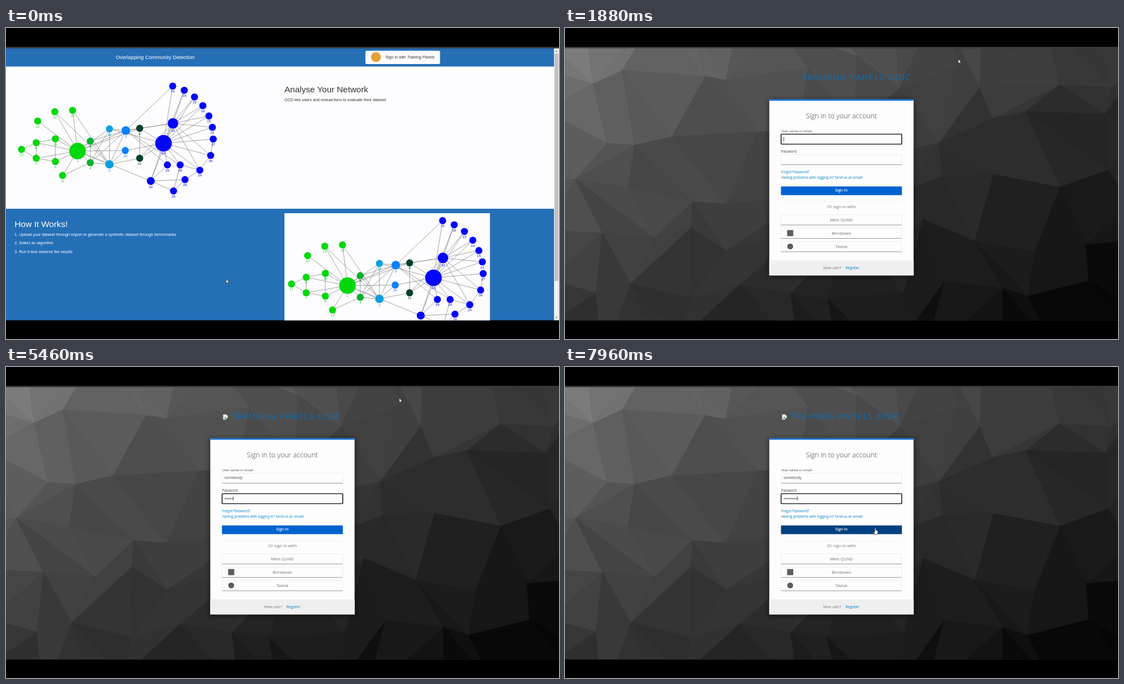
An HTML page that plays this animation: 997 px wide and 561 px high, repeating every 8 s.

```html
<!DOCTYPE html>
<html lang="en">
<head>
<meta charset="utf-8">
<title>Sign-in walkthrough</title>
<style>
  html, body { margin: 0; width: 100%; height: 100%; overflow: hidden; background: #000; }
  svg { display: block; width: 100%; height: 100%; }
  #home { font-family: "Liberation Sans", Arial, sans-serif; font-size: 7.25px; }
  #login { font-family: "Open Sans", sans-serif; font-size: 6.2px; fill: #444; }
  .mid { text-anchor: middle; }
  .heading { font-size: 15.45px; }
  .node-label { font-size: 6.2px; text-anchor: middle; }
  .title { font-size: 15px; letter-spacing: 1.56px; fill: #0b70ba; }
  .link { fill: #0080c0; }
  .typed { font-size: 6.6px; }
  .provider { font-size: 7.4px; fill: #6a6e73; }
  .field { fill: #fdfdfe; stroke: #e9e9eb; stroke-width: .8; }
  .underline { stroke: #8d8f92; stroke-width: .9; }
  .focus { fill: #fdfdfe; stroke: #222429; stroke-width: 1.7; }
</style>
</head>
<body>
<svg viewBox="0 0 997 561" preserveAspectRatio="none">
  <defs>
    <clipPath id="page"><rect y="36.5" width="997" height="491"/></clipPath>
    <filter id="shadow" x="-10%" y="-10%" width="120%" height="120%"><feGaussianBlur stdDeviation="4"/></filter>
  </defs>
  <rect width="997" height="561"/>
  <rect y="34" width="997" height="3" fill="#3a3a3b"/>

  <g clip-path="url(#page)">
    <g id="home">
      <rect y="36.5" width="988" height="491" fill="#256fb7"/>
      <rect y="69.5" width="988" height="256.5" fill="#fdfcfe"/>
      <rect x="502" y="334" width="370.5" height="200" fill="#fdfcfe"/>
      <rect x="648" y="41" width="134.5" height="24" rx="2" fill="#fdfcfe"/>
      <circle cx="667" cy="52.5" r="9" fill="#e5a23a"/>
      <g fill="#fff">
        <text x="198" y="55.6" font-size="9.33">Overlapping Community Detection</text>
        <text x="15.5" y="358.5" class="heading">How It Works!</text>
        <text x="15.5" y="374.5">1. Upload your dataset through import or generate a synthetic dataset through benchmarks</text>
        <text x="15.5" y="390.2">2. Select an algorithm</text>
        <text x="15.5" y="405.8">3. Run it and observe the results</text>
      </g>
      <g fill="#333">
        <text x="684" y="55.2">Sign in with <tspan font-style="italic">Training Panels</tspan></text>
        <text x="502" y="116" class="heading">Analyse Your Network</text>
        <text x="502" y="131.8">OCD lets users and researchers to evaluate their dataset</text>
      </g>
      <g id="graph"></g>
      <use href="#graph" x="486.7" y="242.7"/>
      <rect x="988" y="36.5" width="9" height="491" fill="#f1f1f2"/>
      <rect x="989" y="46" width="7" height="410" fill="#c1c1c3"/>
      <path d="M990.5 43l2-2.4 2 2.4zM990.5 521l2 2.4 2-2.4z" fill="#777"/>
    </g>

    <g id="login">
      <g id="mesh"></g>
      <g id="broken">
        <path d="M391.5 85.5h5.5l3 3v6.5h-8.5z" fill="#e8e9ec"/>
        <path d="M392.5 93.5l3-3.5 2 1.5-2 2z" fill="#58a55c"/>
        <path d="M396 95l4-4v4z" fill="#444"/>
      </g>
      <text id="heading" y="94.3" class="title mid">TRAINING PANELS OIDC</text>
      <rect x="367" y="129" width="263" height="320" opacity=".5" fill="#000" filter="url(#shadow)"/>
      <rect x="368.3" y="128.5" width="260.2" height="317.8" fill="#fdfdfe"/>
      <rect x="368.3" y="128.5" width="260.2" height="2.5" fill="#0062cc"/>
      <rect x="368.3" y="419" width="260.2" height="27.3" fill="#f0eff0"/>
      <text x="498.3" y="163.3" class="mid" font-size="12.5" font-weight="300">Sign in to your account</text>
      <text x="389.7" y="187.7" font-size="6.05">User name or email</text>
      <text x="389.7" y="225">Password</text>
      <g id="fields"></g>
      <text id="account" x="394" y="202.3" class="typed"></text>
      <g id="dots"></g>
      <rect id="caret" width=".8" height="7.5" fill="#222"/>
      <text x="389.7" y="261.8" class="link">Forgot Password?</text>
      <text x="389.7" y="272" class="link">Having problems with logging in? Send us an email!</text>
      <rect id="submit" x="389.4" y="285.8" width="218" height="15.7"/>
      <text x="498.3" y="295.3" class="mid" font-size="6.8" font-weight="600" fill="#fff">Sign In</text>
      <path d="M389.5 313H607" stroke="#f1f1f2"/>
      <text x="498.3" y="325.4" class="mid" font-size="7.7" fill="#777">Or sign in with</text>
      <g id="providers"></g>
      <rect x="400.5" y="364.5" width="11" height="11" fill="#5a5c60"/>
      <circle cx="406" cy="394" r="5.3" fill="#5a5c60"/>
      <text x="465.5" y="434.9" font-size="6.7" fill="#777">New user?</text>
      <text x="505.7" y="434.9" font-size="6.7" class="link">Register</text>
    </g>
  </g>

  <g id="cursor" stroke="#222" stroke-width=".7" stroke-linejoin="round" fill="#fff">
    <path id="arrow" d="M0 0V7.8L1.8 6.2 3 9 4.2 8.5 3 5.8H5.4Z"/>
    <path id="hand" d="M-.9 .8Q0-.7 .9 .8V4L4.6 5V8.5L3.7 11.5H-.8L-3 7.2-2.4 6.2-.9 7.2Z"/>
  </g>
</svg>
<script>
const $ = id => document.getElementById(id);
const show = (id, on) => $(id).style.display = on ? '' : 'none';
const range = (from, to) => Array.from({ length: to - from + 1 }, (_, i) => from + i);

function drawGraph() {
  // Hubs and a few anchors; the rest sit on arcs and in mirrored pairs
  const at = { 1: [129, 222], 3: [216, 185], 13: [102, 266], 17: [28, 219], 20: [215, 221],
    25: [302, 294], 28: [314, 247], 29: [291, 247], 32: [261, 276], 33: [301, 172], 34: [284, 208] };
  const arc = (ids, [cx, cy], r, growth, start, step) => ids.forEach((id, i) => {
    const a = (start + step * i) * Math.PI / 180, d = r + growth * i;
    at[id] = [cx + d * Math.cos(a), cy + d * Math.sin(a)];
  });
  const pair = (top, bottom, x, y, half) => {
    at[top] = [x, y - half];
    at[bottom] = [x, y + half];
  };
  arc([10, 16, 23, 19, 15, 21, 27], [282, 200], 97, -.9, -79, 13.2);
  arc([30, 24, 26], [282, 200], 92, -4, 19, 21);
  arc([12, 22, 18], at[1], 90, -8, 217, 23);
  pair(6, 7, 54.5, 221, 14);
  pair(11, 5, 89, 220.5, 20.5);
  pair(8, 4, 152, 223.5, 19.5);
  pair(14, 2, 186.5, 214, 32);
  pair(9, 31, 241, 208, 27);

  let lines = '';
  const chain = (...ids) => lines += 'M' + ids.map(id => at[id]).join('L');
  const connect = (hubs, ends) => hubs.forEach(hub => ends.forEach(end => chain(hub, end)));
  connect([1], [...range(2, 9), ...range(11, 14), 18, 20, 22, 32]);
  connect([2, 3, 4], [8, 14]);
  connect([2], [3, 18, 20, 22, 31]);
  connect([3], [9, 10, 28, 29, 33]);
  connect([4], [2, 3, 13]);
  connect([33, 34], [9, 15, 16, 19, 21, 23, 24, 30, 31, 32]);
  connect([34], [10, 14, 20, 27, 28, 29, 33]);
  connect([24, 25], [26, 28]);
  chain(7, 6, 11, 5, 7, 17, 6);
  chain(24, 30, 27);
  chain(25, 32, 26);
  chain(29, 32);
  chain(9, 31);

  // Community colour shifts from left to right
  const tint = x => x < 135 ? '#00d80a' : x < 165 ? '#06b02f' : x < 200 ? '#0b9fe0'
    : x < 225 ? '#0a80fa' : x < 250 ? '#04402a' : '#0505fa';
  const radius = id => ({ 1: 15, 34: 15, 33: 9.6, 2: 7.6, 3: 7.8, 32: 7.2 })[id] || 6.4;
  const nodes = Object.entries(at).map(([id, [x, y]]) => `<g fill="${tint(x)}">
    <circle cx="${x}" cy="${y}" r="${radius(id)}"/>
    <text class="node-label" x="${x}" y="${y + radius(id) + 5.3}">${id}</text></g>`);
  $('graph').innerHTML = `<path d="${lines}" fill="none" stroke="#858585" stroke-width=".75"/>` + nodes.join('');
}

// Low-poly backdrop: a jittered grid split into triangles, darker to the lower right
function drawMesh() {
  const cols = 12, rows = 6, w = 997 / (cols - 1), h = 491 / (rows - 1);
  let seed = 11, out = '';
  const random = () => (seed = seed * 16807 % 2147483647) / 2147483647;
  const jitter = () => (random() - .5) * .75;
  const grid = range(0, rows).map(r => range(0, cols).map(c =>
    [(c - .5 + jitter()) * w, 36.5 + (r - .5 + jitter()) * h]));
  const facet = (...points) => {
    const [x, y] = [0, 1].map(k => points.reduce((sum, p) => sum + p[k], 0) / 3);
    const glow = 22 * Math.exp(-Math.hypot(x, y - 37) / 150);
    const v = Math.max(2, Math.round(104 - 50 * x / 997 - 50 * (y - 37) / 491 + glow + jitter() * 13));
    const tone = `rgb(${v},${v},${v + 1})`;
    out += `<path d="M${points.join('L')}Z" fill="${tone}" stroke="${tone}" stroke-width=".6"/>`;
  };
  for (let r = 0; r < rows; r++) for (let c = 0; c < cols; c++) {
    const a = grid[r][c], b = grid[r][c + 1], d = grid[r + 1][c], e = grid[r + 1][c + 1];
    if (random() < .5) { facet(a, b, d); facet(b, d, e); }
    else { facet(a, b, e); facet(a, d, e); }
  }
  $('mesh').innerHTML = `<rect y="36" width="997" height="492" fill="#333"/>` + out;
}

const box = (y, h, focused) => `<rect x="389.6" y="${y}" width="217.6" height="${h}" rx="1"
  class="${focused ? 'focus' : 'field'}"/>` +
  (focused ? '' : `<path class="underline" d="M389.5 ${y + h}H607"/>`);

function drawProviders() {
  const names = ['Mein QUND', 'Brindovex', 'Tavlok'];
  $('providers').innerHTML = names.map((name, i) => box(337 + i * 24.2, 18.3) +
    `<text class="provider mid" x="498.3" y="${348.8 + i * 23.9}">${name}</text>`).join('');
}

// Timeline in ms
const LOOP = 8000, OPEN_LOGIN = 1700, IMAGE_FAILS = 2200, TAB = 4730;
const ACCOUNT = 'somebody';
const nameKeys = { start: 3070, step: 210 }, passKeys = { start: 4860, step: 140 };
const typedCount = (t, { start, step }) =>
  Math.max(0, Math.min(ACCOUNT.length, Math.floor((t - start) / step) + 1));
const lastKey = (t, keys, focusAt) => {
  const n = typedCount(t, keys);
  return n ? keys.start + (n - 1) * keys.step : focusAt;
};
const ease = (t, from, to) => {
  const u = Math.max(0, Math.min(1, (t - from) / (to - from)));
  return u * u * (3 - 2 * u);
};

function pointer(t) {
  if (t < OPEN_LOGIN) {
    const e = ease(t, 200, 1254);
    return [397 + 312 * e, 453 - 397 * e];
  }
  const e = ease(t, 6500, 7635);
  return [709 - 149.5 * e ** 1.19, 56 + 234.5 * e];
}

let focusedField;
function render(t) {
  const onLogin = t >= OPEN_LOGIN, inPassword = t >= TAB;
  show('home', !onLogin);
  show('login', onLogin);

  const broken = t >= IMAGE_FAILS;
  show('broken', broken);
  $('heading').setAttribute('x', broken ? 505.5 : 526);

  if (focusedField !== inPassword) {
    focusedField = inPassword;
    $('fields').innerHTML = box(191.5, 18, !inPassword) + box(228.5, 18, inPassword);
  }
  $('account').textContent = ACCOUNT.slice(0, typedCount(t, nameKeys));
  const dots = typedCount(t, passKeys);
  $('dots').innerHTML = Array.from({ length: dots }, (_, i) =>
    `<circle cx="${395.5 + i * 3.1}" cy="237.4" r="1.05"/>`).join('');

  const since = t - (inPassword ? lastKey(t, passKeys, TAB) : lastKey(t, nameKeys, OPEN_LOGIN));
  show('caret', since % 1000 < 500);
  const caretX = inPassword ? 394 + dots * 3.1
    : 394.2 + (onLogin ? $('account').getComputedTextLength() : 0);
  $('caret').setAttribute('x', caretX);
  $('caret').setAttribute('y', inPassword ? 233.5 : 196.7);

  const [x, y] = pointer(t);
  const overButton = onLogin ? y > 286 : y < 65;
  $('submit').setAttribute('fill', onLogin && overButton ? '#004080' : '#0062d0');
  $('cursor').setAttribute('transform', `translate(${x} ${y})`);
  show('arrow', !overButton);
  show('hand', overButton);
}

drawGraph();
drawMesh();
drawProviders();
const begin = performance.now();
function tick() {
  render((performance.now() - begin) % LOOP);
  requestAnimationFrame(tick);
}
tick();
</script>
</body>
</html>
```
